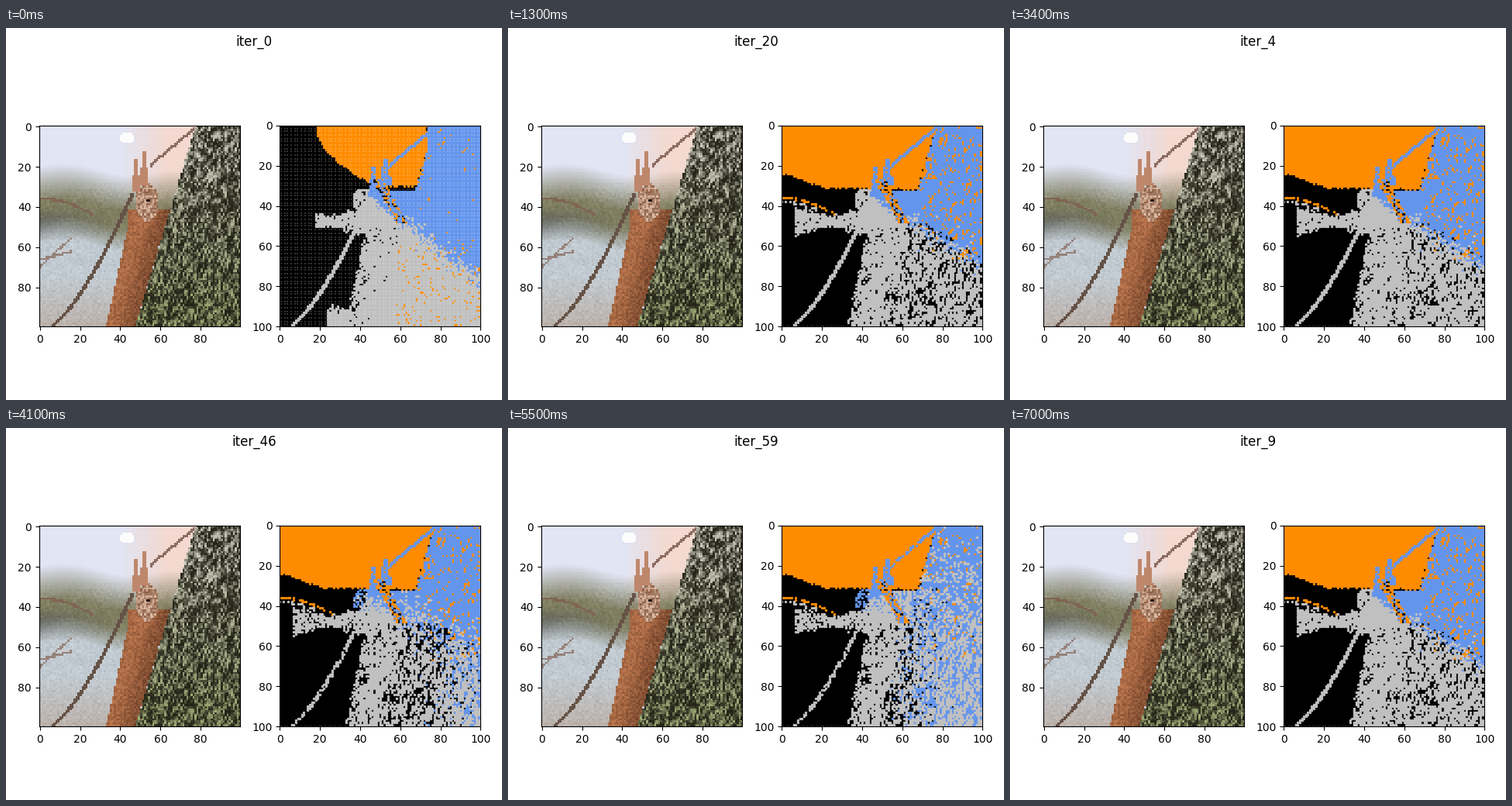
A matplotlib script for the animation above (7.1 s loop, 640x480 px).

```python
import numpy as np
import matplotlib.pyplot as plt
from matplotlib.animation import FuncAnimation
from matplotlib.colors import to_rgb

W, H, DPI, SIZE = 640, 480, 100, 100
BLACK, ORANGE, BLUE, SILVER = range(4)
COLORS = ["black", "darkorange", "cornflowerblue", "silver"]
RGB = np.array([to_rgb(c) for c in COLORS])
ORDER = sorted(range(71), key=str)  # iterations play in alphabetical order

rng = np.random.default_rng(7)
Y, X = np.mgrid[0:SIZE, 0:SIZE].astype(float)
CELLS = np.column_stack([X.ravel(), Y.ravel()])


def ramp(v, start, stop):
    return np.clip((v - start) / (stop - start), 0, 1)


def mix(a, b, t):
    t = t[..., None]
    return np.array(a) * (1 - t) + np.array(b) * t


def rank(field):
    """Replace values by their rank, spread evenly over 0..1."""
    return field.ravel().argsort().argsort().reshape(field.shape) / field.size


def spike(x, top, slope, foot):
    """Upright ear: a triangle that widens from its tip."""
    return (abs(X - x) <= slope * (Y - top)) & (Y < foot)


# Noise: bark streaks along the trunk, and loose grain
raw = rng.random((SIZE, SIZE))
bark = rank(raw + 0.7 * np.roll(raw, (1, 0), (0, 1))
            + 0.5 * np.roll(raw, (2, -1), (0, 1)))
grain, flecks, choice = rng.random((3, SIZE, SIZE))
jitter = rng.normal(size=(SIZE, SIZE))

# Shapes shared by both panels
trunk_edge = 77 - 0.3 * Y
trunk = X > trunk_edge
body_edge = 43.5 - 0.22 * np.maximum(Y - 50, 0)
stem_x = 4 + 42 * ramp(Y, 100, 33) ** 0.7
stem = (abs(X - stem_x) < 1.1) & (Y > 33)
bough = (abs(Y - 20 + 0.83 * (X - 54)) < 0.9) & (X > 54) & (X < 78)
twig = (abs(Y - 36 - 0.012 * X ** 2) < 0.6) & (X < 27)
ears = spike(46.5, 18, 0.17, 36) | spike(52.5, 14, 0.22, 30)
muzzle_x = 49 + 0.55 * (Y - 27)
face = (abs(X - muzzle_x) < 2.7) & (Y > 26) & (Y < 49)


def picture():
    """Soft tones and flat shapes of a squirrel on a trunk."""
    soft = Y + 2 * np.sin(X / 9) - 0.06 * X
    img = mix((225, 229, 244), (243, 217, 208), ramp(X, 40, 62))
    img = mix(img, (128, 127, 98), ramp(soft, 20, 38))
    img = mix(img, (92, 94, 88), ramp(soft, 40, 50) * ramp(X, 40, 0))
    img = mix(img, (193, 202, 209), ramp(soft, 46, 58))
    img = mix(img, (188, 177, 170), ramp(Y, 75, 100))
    img[np.hypot(X - 43, (Y - 6) * 1.3) < 3.5] = 252
    img += (5 * jitter * ramp(Y, 25, 35))[..., None]

    img[twig] = (128, 98, 84)
    for slope in (0.25, 0.9):
        img[(abs(Y - 65 + slope * (X - 5)) < 0.6) & (X < 16)] = (150, 130, 122)
    img[stem] = (101, 82, 70)
    img[bough] = (140, 108, 98)

    light = mix((205, 203, 188), (160, 172, 120), ramp(Y, 20, 90))
    img[trunk] = mix((36, 36, 24), light, bark ** 1.6)[trunk]
    fur = mix((104, 60, 38), (192, 122, 80), (grain + ramp(trunk_edge - X, 0, 12)) / 2)
    body = (X > body_edge) & (X < trunk_edge) & (Y > 41)
    img[body] = fur[body]
    head = np.hypot(X - 53, (Y - 38) * 0.65) < 6
    img[head] = mix((140, 95, 70), (222, 188, 165), grain)[head]
    img[spike(47.5, 13, 0.13, 33) | spike(51.5, 9, 0.13, 30)] = (190, 135, 108)
    img[np.hypot(X - 53.5, Y - 37) < 1] = (35, 25, 22)
    return np.clip(img, 0, 255).astype(np.uint8)


def labels(n):
    """Cluster of every cell after n iterations."""
    settled, drift, end = ramp(n, 0, 3), ramp(n, 20, 50), ramp(n, 50, 65)
    lab = np.full((SIZE, SIZE), BLACK)

    # Sky: starts as a curve to the right, then settles on the horizon
    curve = 30 * np.sqrt(ramp(X, 18, 48)) - 20 * (X < 18)
    horizon = 27.5 + 3.5 * np.tanh((X - 12) / 7) + 0.04 * np.maximum(X - 45, 0)
    skyline = curve + (horizon - curve) * settled + 0.35 * jitter
    right = trunk_edge - (1 - settled) * ramp(Y, 12, 0) * 4
    sky = (Y < skyline) & (X < right + 0.3 * jitter)
    lab[sky] = ORANGE

    # Trunk and squirrel: blue above a sloping line, silver below
    edge = np.where(Y < 33, right, body_edge + 0.7 * jitter)
    subject = (X > edge) & ~sky
    slope = 0.75 - 0.1 * settled - 0.12 * drift - 0.9 * end
    spread = (4 + 5 * drift + 14 * end) * np.clip((X - 45) / 20, 0.3, 1)
    line = 34 + slope * np.maximum(X - 43, 0)
    silver = Y > line + spread * jitter
    lab[subject] = np.where(silver, SILVER, BLUE)[subject]

    # Dark bark cells turn blue as a front moves in from the right
    rim = ramp(X - body_edge, 7, 0)
    share = np.where(trunk, 0.22 * settled + 0.1 * ramp(n, 3, 20) + 0.1 * drift + 0.1 * end,
                     0.04 + 0.04 * settled + 0.08 * drift + 0.2 * rim)
    dark = subject & (bark < share) & (Y > line - 5) & ((Y > 48) | (trunk & (end > 0)))
    front = 120 - 38 * drift - 26 * end
    lab[dark] = np.where(X + 8 * jitter > front, BLUE, BLACK)[dark]

    # Orange flecks: streaks in the blue, crumbs in the early silver
    streak = np.roll(bark, 37, axis=0) < 0.015 + (0.15 - 0.04 * drift) * settled * (1 - 0.8 * end)
    lab[(lab == BLUE) & streak & (X > 68) & (Y < 68)] = ORANGE
    lab[(X > 57) & (Y > 55) & (flecks < 0.09 * (1 - settled))] = ORANGE

    # Bush, stem, bough and twig
    bush = abs(Y - 47.5) < 2.5 + (0.24 - 0.08 * end) * abs(X - 24) + 0.7 * jitter
    bush &= (X > 17 - 11 * settled) & (X < 47) & (flecks > 0.08 + 0.12 * drift)
    lab[bush & ~sky] = SILVER
    neck = (np.hypot(X - 42, Y - 37) < 6) & ~sky
    lab[neck & (choice < 0.9 - 0.45 * drift)] = SILVER
    lab[neck & (choice < 0.45 * drift)] = BLUE
    lab[stem & (flecks > 0.25 * drift)] = SILVER
    lab[bough & (flecks > 0.25 * end)] = BLUE
    if n == 0:
        lab[(Y > 91 + jitter) & (X > 23) & (X < 35)] = SILVER
    else:
        lab[twig & (choice < 0.7)] = ORANGE
        lab[np.roll(twig, 2, axis=0) & (X < 18) & (grain < 0.6)] = SILVER

    # Ears and face
    lab[ears & (flecks < 0.85)] = BLUE
    orange = 0.35 + 0.2 * settled
    shade = orange + 0.2 * (1 - end)
    spots = np.where(choice < orange, ORANGE, np.where(choice < shade, BLACK, BLUE))
    lab[face] = spots[face]
    return lab


def panel(left, lo, hi, stop):
    ax = fig.add_axes([left / W, 94.9 / H, 259.2 / W, 259.2 / H])
    ticks = range(0, stop, 20)
    ax.set(xticks=ticks, yticks=ticks, xlim=(lo, hi), ylim=(hi, lo), autoscale_on=False)
    return ax


fig = plt.figure(figsize=(W / DPI, H / DPI), dpi=DPI)
title = fig.suptitle("iter_0", y=0.982)
photo = panel(42.5, -0.5, 99.5, 100)
photo.imshow(picture(), interpolation="nearest", aspect="auto")

chart = panel(353.2, 0, 100, 101)
fill = chart.imshow(np.ones((SIZE, SIZE, 3)), interpolation="nearest", aspect="auto",
                    extent=(-0.5, 99.5, 99.5, -0.5), zorder=0)
dots = [chart.scatter([], [], s=2, color=c) for c in COLORS]
chart.set(xlim=(0, 100), ylim=(100, 0))


def draw(i):
    n = ORDER[i]
    lab = labels(n)
    title.set_text(f"iter_{n}")
    # Repeated plotting closes the gaps between dots after the first pass
    fill.set_visible(n > 0)
    fill.set_data(RGB[lab])
    for k, group in enumerate(dots):
        group.set_offsets(CELLS[lab.ravel() == k])
    return [title, fill, *dots]


anim = FuncAnimation(fig, draw, frames=len(ORDER), interval=100, repeat=True,
                     repeat_delay=0, blit=False)
plt.show()
```
